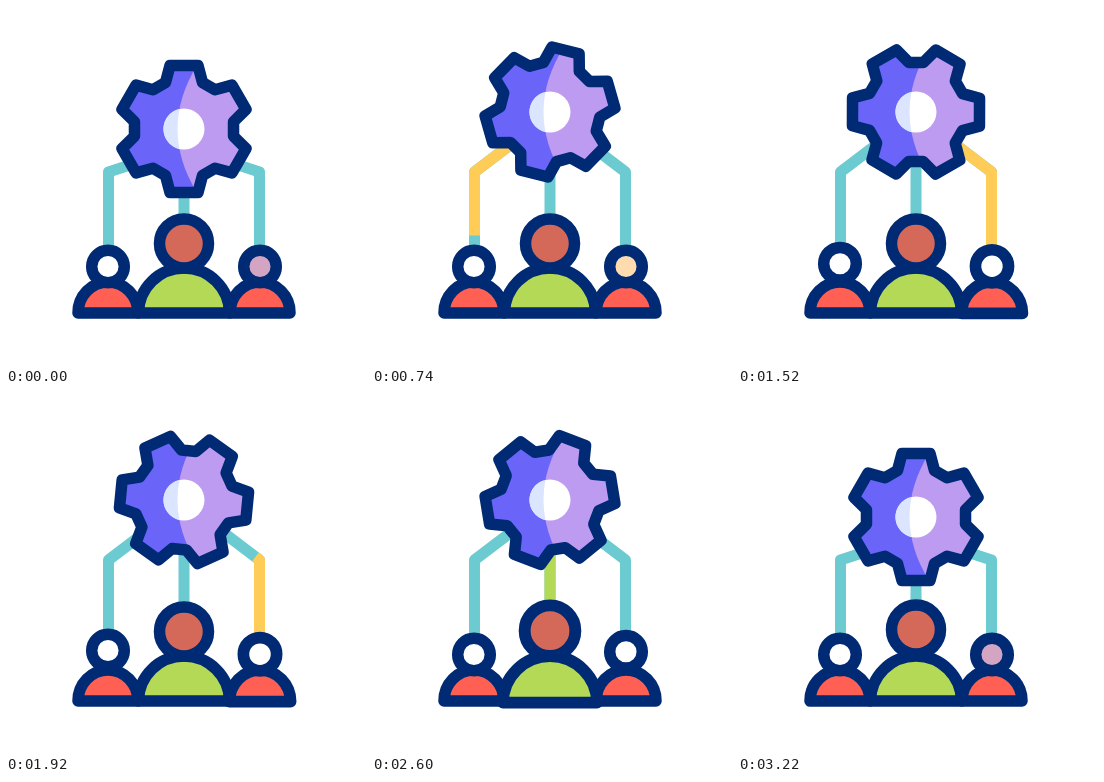
Animation of 360 by 360 pixels, one loop 3.24 s. Source, as an HTML page:

```html
<!DOCTYPE html>
<html lang="en">
<head>
<meta charset="utf-8">
<title>Team gear</title>
<style>
html, body { margin: 0; width: 100%; height: 100%; overflow: hidden; background: #fff; }
svg { display: block; width: 100%; height: 100%; }
.navy { stroke: #002a73; stroke-width: 11.5; stroke-linejoin: round; }
.wire { fill: none; stroke-width: 11; stroke-linejoin: round; }
.spark { stroke: #ffcd57; stroke-width: 11; stroke-linecap: round; }
</style>
</head>
<body>
<svg id="stage" viewBox="0 0 360 360">
  <clipPath id="cut"><polygon class="cog"/></clipPath>
  <g id="wires"></g>
  <g id="sparks"></g>
  <g id="gear">
    <g clip-path="url(#cut)">
      <path d="M-80-80H80V80H-80Z" fill="#6a65f8"/>
      <path d="M17-70Q-30 0 17 70H80V-70Z" fill="#bc9bf1"/>
    </g>
    <circle r="20.5" fill="#fff"/>
    <path d="M-4.6-20A20.5 20.5 0 0 0-4.6 20Q-8.4 0-4.6-20Z" fill="#dbe5ff"/>
    <polygon class="cog navy" fill="none"/>
  </g>
  <g id="people"></g>
</svg>
<script>
const LOOP = 3240;
const $ = id => document.getElementById(id);
const clamp = x => Math.min(1, Math.max(0, x));
const ramp = (t, a, b) => clamp((t - a) / (b - a));
const smooth = x => x * x * (3 - 2 * x);
const bump = (t, a, b) => Math.sin(Math.PI * ramp(t, a, b));

function add(parent, tag, attrs) {
  const el = document.createElementNS('http://www.w3.org/2000/svg', tag);
  set(el, attrs);
  parent.appendChild(el);
  return el;
}
function set(el, attrs) {
  for (const k in attrs) el.setAttribute(k, attrs[k]);
}

// Piecewise linear value through [time, value] keys.
function track(keys, t) {
  if (t <= keys[0][0]) return keys[0][1];
  for (let i = 1; i < keys.length; i++) {
    const [a, u] = keys[i - 1], [b, v] = keys[i];
    if (t < b) return u + (v - u) * (t - a) / (b - a);
  }
  return keys[keys.length - 1][1];
}
// Last value whose time has been reached.
const pick = (steps, t) => steps.filter(s => s[0] <= t).pop()[1];

const TURN = [[610, 0], [740, 14], [1140, 78.5], [1520, 150], [2340, 284], [2880, 360]];

const tooth = [[-18.5, -46.5], [-14, -63.5], [14, -63.5], [18.5, -46.5]];
const points = [];
for (let k = 0; k < 6; k++) {
  const c = Math.cos(k * Math.PI / 3), s = Math.sin(k * Math.PI / 3);
  for (const [x, y] of tooth) points.push([x * c - y * s, x * s + y * c]);
}
const cogs = document.querySelectorAll('.cog');
cogs.forEach(c => set(c, { points: points.join(' ') }));

// Wires carry a coloured signal from the gear down to each person.
const wires = [
  { path: y => `M142 ${y + 30}L102.5 166V242`, color: '#ffcd57', start: 480 },
  { path: y => `M214 ${y + 30}L253.5 166V242`, color: '#ffcd57', start: 1210 },
  { path: y => `M178 ${y + 40}V215`, color: '#b3d957', start: 1920 }
];
for (const w of wires) {
  w.base = add($('wires'), 'path', { class: 'wire', stroke: '#6bcbd1' });
  w.signal = add($('wires'), 'path', { class: 'wire', stroke: w.color, pathLength: 1 });
}

const side = { w: 30, top: 276, headY: 260.5, r: 16.3, fill: '#ff6053', pivot: 276, swell: .1 };
const people = [
  {
    ...side, x: 102, pulse: 800, hop: 1420,
    skin: [[0, '#fff'], [1000, '#ffb9bd'], [1240, '#fff']]
  },
  {
    ...side, x: 254, pulse: 1500, hop: 2050,
    skin: [[0, '#d3a5c3'], [500, '#ffdcb0'], [1000, '#ffb9bd'], [1240, '#fff'], [2620, '#ffdcb0'], [3060, '#d3a5c3']]
  },
  {
    x: 178, w: 45.5, top: 262, headY: 237.5, r: 24.5, fill: '#b3d957', pivot: 260, swell: .075,
    pulse: 2220, hop: 2640, skin: [[0, '#d4695a']]
  }
];
for (const p of people) {
  const { w, top } = p, h = 307 - top;
  p.group = add($('people'), 'g', {});
  add(p.group, 'path', {
    class: 'navy', fill: p.fill,
    d: `M${-w} 307c0 ${-h * .55} ${w * .45} ${-h} ${w} ${-h}s${w} ${h * .45} ${w} ${h}z`
  });
  p.head = add(p.group, 'circle', { class: 'navy', r: p.r });
}

// Each spark: centre and outward direction.
const sparks = [
  [84, 95, -.75, -.66], [79, 123, -1, 0], [81, 152, -.85, .53],
  [271.5, 98, .76, -.65], [273, 126, 1, 0], [270, 153, .7, .7]
].map(([x, y, dx, dy]) => ({ x, y, dx, dy, el: add($('sparks'), 'line', { class: 'spark' }) }));

function draw(t) {
  const y = 123 - 17 * (smooth(ramp(t, 260, 610)) - smooth(ramp(t, 2750, 3080)));
  set($('gear'), { transform: `translate(178 ${y})` });
  cogs.forEach(c => set(c, { transform: `rotate(${track(TURN, t)})` }));

  for (const w of wires) {
    const d = w.path(y);
    const head = ramp(t, w.start, w.start + 290);
    const tail = ramp(t, w.start + 640, w.start + 840);
    set(w.base, { d });
    set(w.signal, {
      d, 'stroke-dasharray': `${head - tail} 2`, 'stroke-dashoffset': -tail,
      visibility: head > tail ? 'visible' : 'hidden'
    });
  }

  for (const p of people) {
    const s = 1 + p.swell * bump(t, p.pulse, p.pulse + 450);
    set(p.group, { transform: `translate(${p.x} ${p.pivot}) scale(${s}) translate(0 ${-p.pivot})` });
    set(p.head, { cy: p.headY - 6 * bump(t, p.hop, p.hop + 650), fill: pick(p.skin, t) });
  }

  const out = -12.5 + 28 * ramp(t, 2760, 2960);
  const back = -12.5 + 28 * ramp(t, 2820, 3120);
  for (const s of sparks) {
    set(s.el, {
      x1: s.x + s.dx * back, y1: s.y + s.dy * back,
      x2: s.x + s.dx * out, y2: s.y + s.dy * out,
      visibility: out > back ? 'visible' : 'hidden'
    });
  }
}

const begin = performance.now();
function frame() {
  draw((performance.now() - begin) % LOOP);
  requestAnimationFrame(frame);
}
frame();
</script>
</body>
</html>
```
